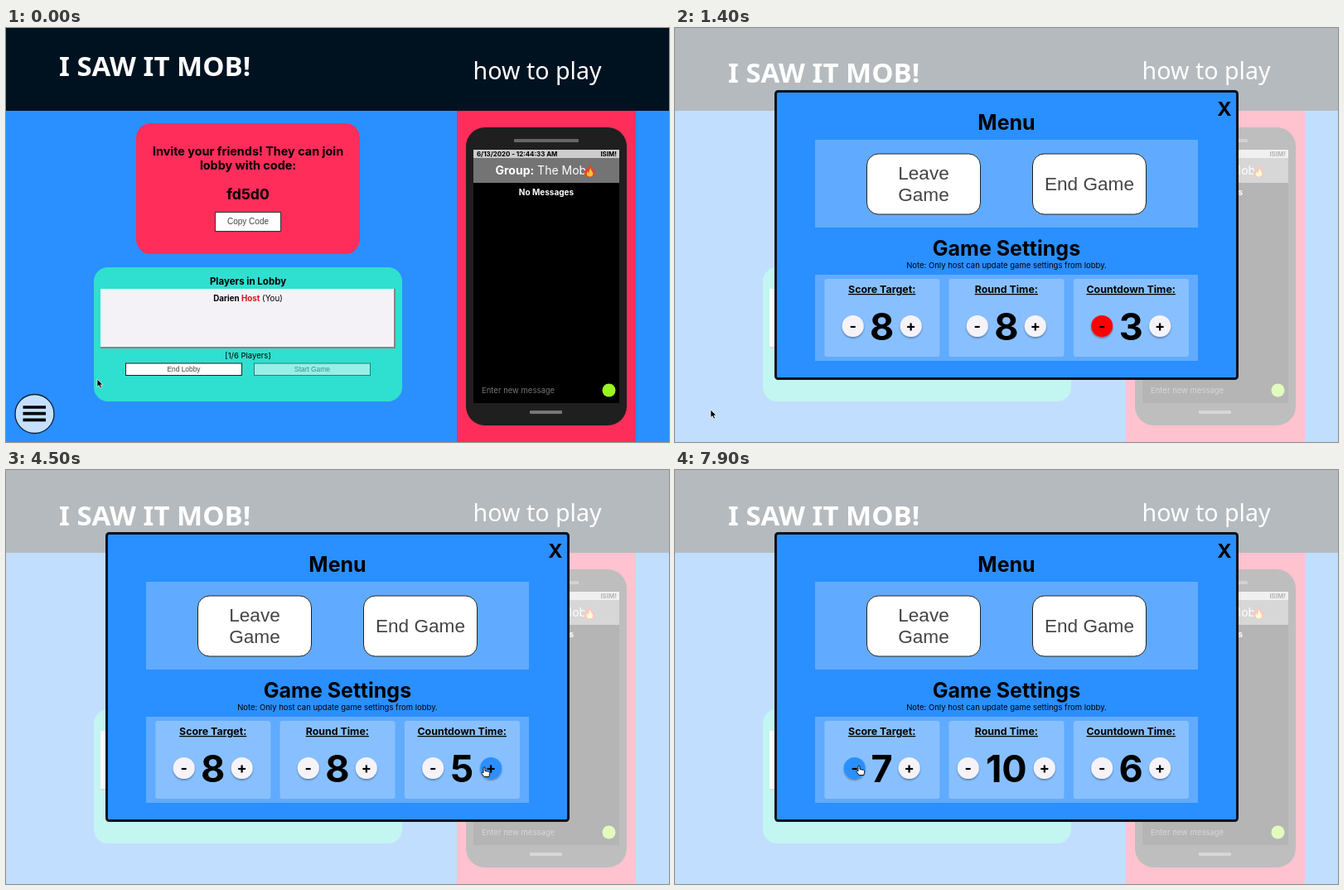
An HTML page for the animation above (8000 ms loop, 800x500 px).

```html
<!DOCTYPE html>
<html>
<head>
<meta charset="utf-8">
<style>
html, body { margin: 0; width: 100%; height: 100%; overflow: hidden; background: #2a8fff; }
svg { display: block; width: 800px; height: 500px; }
text { font-family: Inter, sans-serif; white-space: pre; }
.b { font-weight: 700; }
.m { text-anchor: middle; }
.a { font-family: "Liberation Sans", Arial, sans-serif; fill: #444; }
.n { font-family: "Noto Sans", sans-serif; fill: #fff; }
</style>
</head>
<body>
<svg viewBox="0 0 800 500">
  <defs>
    <filter id="shadow" x="-30%" y="-30%" width="160%" height="170%">
      <feDropShadow dx="0" dy="1.5" stdDeviation="1.2" flood-opacity=".4"/>
    </filter>
  </defs>
  <rect width="800" height="500" fill="#2a8fff"/>
  <rect width="800" height="100" fill="#001220"/>

  <!-- invite card -->
  <rect x="157" y="115" width="270" height="158" rx="18" fill="#ff2d5a"/>
  <g class="b m">
    <text x="292" y="154" font-size="14.4">Invite your friends! They can join</text>
    <text x="292" y="171" font-size="14.4">lobby with code:</text>
    <text x="292" y="207" font-size="17.6">fd5d0</text>
  </g>
  <rect x="252.5" y="222.5" width="79" height="23" fill="#fff" stroke="#333"/>
  <text class="a m" x="292" y="237" font-size="10">Copy Code</text>

  <!-- lobby card -->
  <rect x="106" y="289" width="372" height="162" rx="17" fill="#2fdfcf"/>
  <text class="b m" x="292" y="310" font-size="11.5">Players in Lobby</text>
  <rect x="114" y="315" width="356" height="72" fill="#f4f2f6"/>
  <path d="M114 386H469V315" fill="none" stroke="#858585" stroke-width="2"/>
  <text class="m" x="292" y="330" font-size="9.8"><tspan class="b">Darien <tspan fill="#d8101c">Host</tspan></tspan> (You)</text>
  <text class="m" x="292" y="399" font-size="9.5">[1/6 Players]</text>
  <rect x="144.5" y="405" width="140" height="14.5" fill="#fff" stroke="#222"/>
  <text class="a m" x="214.5" y="415" font-size="8.4">End Lobby</text>
  <g opacity=".5">
    <rect x="299.5" y="405" width="140" height="14.5" fill="#fff" stroke="#222"/>
    <text class="a m" x="369.5" y="415" font-size="8.4">Start Game</text>
  </g>

  <!-- phone -->
  <rect x="544" y="100" width="216" height="400" fill="#ff2d5a"/>
  <rect x="555" y="120" width="194" height="360" rx="23" fill="#1f1f1f"/>
  <rect x="613" y="134" width="78" height="4" rx="1" fill="#666"/>
  <rect x="632" y="462" width="39" height="4" rx="1" fill="#777"/>
  <rect x="564" y="147" width="176" height="306"/>
  <rect x="564" y="147" width="176" height="10" fill="#ccc"/>
  <text class="b" id="clock" x="568" y="154.5" font-size="7.9"></text>
  <text class="b" x="737" y="154.5" font-size="7.9" text-anchor="end">ISIM!</text>
  <rect x="564" y="157" width="176" height="30" fill="#747474"/>
  <text x="590.5" y="177" font-size="14" fill="#fff"><tspan class="b">Group:</tspan> The Mob</text>
  <g id="flame">
    <path d="M0 0C-5 0 -8 -3 -7 -7C-6 -9 -5 -9 -4.500 -12C-3 -11 -3 -9 -2.500 -8C-1 -11 -2 -14 0 -17C1 -13 4 -11 4 -8L5.500 -10C8 -5 6 0 0 0Z" fill="#e8421f"/>
    <path id="core" d="M0 -.5C-4 -.5 -5 -4 -3 -7L-1.500 -5C-1 -8 0 -9 1 -12C1 -8 4 -7 4 -4C4 -2 2 -.5 0 -.5Z"/>
  </g>
  <text class="b m" x="652" y="202" font-size="10" fill="#fff">No Messages</text>
  <text x="574" y="441" font-size="9.5" fill="#757575">Enter new message</text>
  <circle cx="727.500" cy="437.500" r="8" fill="#9cf520"/>

  <g id="burger">
    <circle id="disc" cx="34.500" cy="466" r="23.500" stroke-width="1.3"/>
    <path id="bars" d="M20.500 458H48M20.500 465.700H48M20.500 473.400H48" stroke-width="3.700"/>
  </g>

  <rect class="popup" width="800" height="500" fill="#fff" opacity=".71"/>
  <text class="n b" id="title" x="64" font-size="33">I SAW IT MOB!</text>
  <text class="n" x="563.600" y="61.500" font-size="28.600">how to play</text>

  <g class="popup">
    <rect x="121.500" y="76.500" width="557" height="347" rx="3" fill="#2a8fff" stroke="#07131f" stroke-width="3"/>
    <text class="b m" x="663" y="106" font-size="23.500">X</text>
    <text class="b m" x="400" y="123" font-size="25">Menu</text>
    <rect x="169" y="135" width="462" height="106" fill="#fff" opacity=".25"/>
    <g fill="#fff" stroke="#222">
      <rect x="231.500" y="152" width="137" height="73" rx="14"/>
      <rect x="431.500" y="152" width="137" height="73" rx="14"/>
    </g>
    <g font-size="22.600">
      <text class="a m" x="300" y="182.500">Leave</text>
      <text class="a m" x="300" y="208.500">Game</text>
      <text class="a m" x="500" y="195.500">End Game</text>
    </g>
    <text class="b m" x="400" y="275" font-size="25">Game Settings</text>
    <text class="m" x="400" y="290" font-size="9.500">Note: Only host can update game settings from lobby.</text>
    <rect x="169" y="298" width="462" height="104" fill="#fff" opacity=".25"/>
    <g id="cells"></g>
  </g>

  <g id="cursor" stroke-linejoin="round">
    <path id="arrow" d="M0 0V9.500L2.200 7.500L3.800 11L5.500 10.200L4 6.900H7Z" fill="#000" stroke="#fff" stroke-width=".7"/>
    <path id="hand" d="M-1 1C-1 -.5 1 -.5 1 1V4.500L5.500 5.300Q7 5.700 6.700 7.500L5.800 11.500H0L-3 7.500C-3.500 6 -2 5.700 -1 7Z" fill="#fff" stroke="#000" stroke-width=".9"/>
  </g>
</svg>
<script>
const $ = id => document.getElementById(id);
const clamp = v => Math.min(1, Math.max(0, v));
const mix = (a, b, k) => `rgb(${a.map((v, i) => Math.round(v + (b[i] - v) * k))})`;
const WHITE = [245, 243, 248], BLUE = [42, 143, 255], LOOP = 8, OPEN = 1.4;

// Pointer path: time, x, y
const path = [
  [0, 110, 424], [.2, 110, 424], [.8, 43, 461], [1.45, 43, 461], [2.4, 288, 365],
  [2.85, 292, 366], [3.55, 577, 359], [5, 577, 359], [5.4, 466, 366],
  [5.8, 439, 362], [7, 440, 362], [7.55, 222, 357], [8, 222, 357]
];
// Values change at [time, value]; hover spans are [enter, leave]
const cells = [
  { name: "Score Target:", x: 249.7, steps: [[0, 8], [7.75, 7]], minus: [7.5, 9], plus: [2.4, 2.92] },
  { name: "Round Time:", x: 399.8, steps: [[0, 8], [6.3, 9], [6.95, 10]], minus: [9, 9], plus: [5.65, 7.08] },
  { name: "Countdown Time:", x: 550.2, steps: [[0, 3], [4, 4], [4.4, 5], [4.8, 6]], minus: [9, 9], plus: [3.46, 5.05] }
];
const knob = sign => `<g><circle r="13" filter="url(#shadow)"/><text class="b m" y="6" font-size="18">${sign}</text></g>`;

for (const c of cells) {
  const g = document.createElementNS("http://www.w3.org/2000/svg", "g");
  g.innerHTML = `<rect x="${c.x - 69.3}" y="303" width="139" height="94" rx="3" fill="#fff" opacity=".25"/>
    <text class="b m" x="${c.x}" y="320" font-size="12.4" text-decoration="underline">${c.name}</text>
    <text class="b m" x="${c.x}" y="377" font-size="45"></text>${knob("-")}${knob("+")}`;
  $("cells").append(g);
  [, , c.number, c.left, c.right] = g.children;
}

const hover = ([enter, leave], t) => clamp((t - enter) / .3) - clamp((t - leave) / .3);
const inside = ([enter, leave], t) => t >= enter && t < leave;

function pointer(t) {
  const i = Math.max(1, path.findIndex(p => p[0] > t));
  const [t0, x0, y0] = path[i - 1], [t1, x1, y1] = path[i];
  const k = (t - t0) / (t1 - t0), e = k * k * (3 - 2 * k);
  return [x0 + (x1 - x0) * e, y0 + (y1 - y0) * e];
}

function placeKnob(el, x, color) {
  el.setAttribute("transform", `translate(${x} 360)`);
  el.firstChild.setAttribute("fill", color);
}

function draw(t) {
  const open = t >= OPEN;
  document.querySelectorAll(".popup").forEach(e => e.style.display = open ? "" : "none");
  $("burger").style.display = open ? "none" : "";
  $("title").setAttribute("y", 62.3 - 5 * Math.cos((t - .2) * 2 * Math.PI / 3));
  $("clock").textContent = `6/13/2020 - 12:44:${33 + Math.floor(t + .85)} AM`;

  const h = clamp((t - .65) / .3);
  $("disc").setAttribute("fill", mix([197, 224, 255], WHITE, h));
  $("disc").setAttribute("stroke", mix([15, 30, 50], [60, 75, 150], h));
  $("bars").setAttribute("stroke", mix([0, 0, 0], [255, 45, 90], h));

  const flick = Math.sin(t * 13);
  $("flame").setAttribute("transform", `translate(704.500 180) skewX(${flick * 4}) scale(.95 ${.95 + .05 * flick})`);
  $("core").setAttribute("fill", mix([255, 190, 60], [250, 235, 100], clamp(t)));

  let hand = false;
  for (const c of cells) {
    const value = c.steps.filter(s => s[0] <= t).pop()[1];
    const gap = value > 9 ? 46 : value === 7 ? 33 : 35;
    c.number.textContent = value;
    placeKnob(c.left, c.x - gap, value < 4 ? "#f00" : mix(WHITE, BLUE, hover(c.minus, t)));
    placeKnob(c.right, c.x + gap, mix(WHITE, BLUE, hover(c.plus, t)));
    hand ||= inside(c.minus, t) || inside(c.plus, t);
  }
  $("cursor").setAttribute("transform", `translate(${pointer(t)})`);
  $("arrow").style.display = hand ? "none" : "";
  $("hand").style.display = hand ? "" : "none";
}

function frame() {
  draw(performance.now() / 1000 % LOOP);
  requestAnimationFrame(frame);
}
frame();
</script>
</body>
</html>
```
